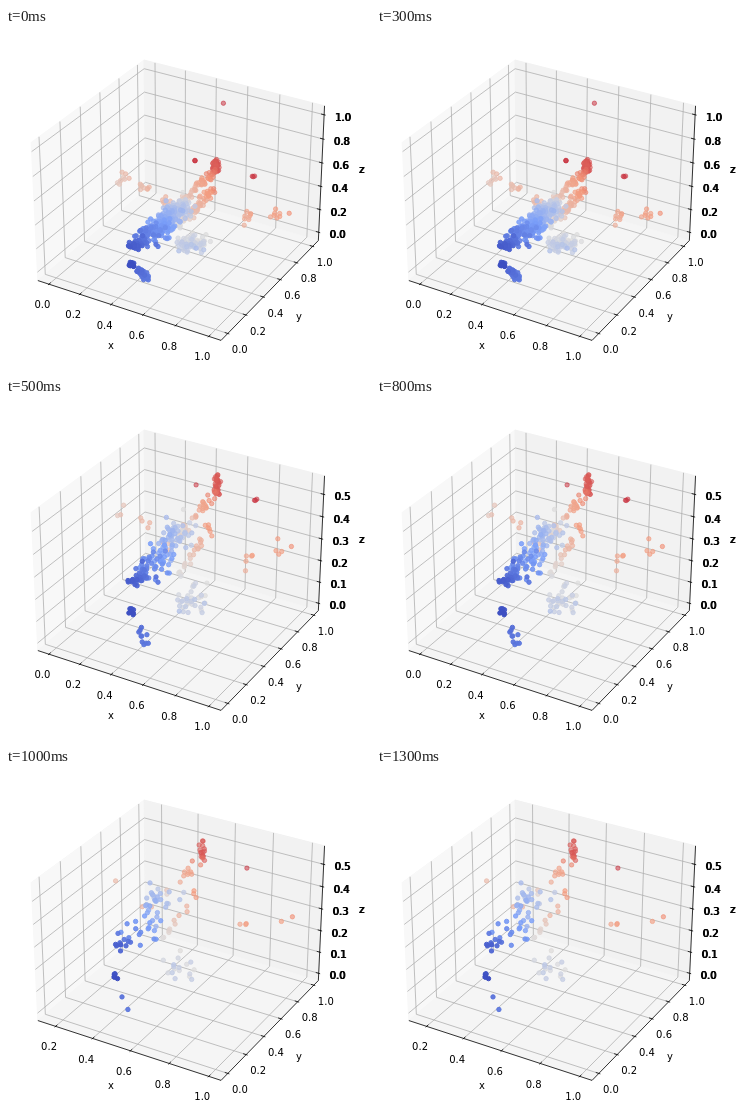
These frames come from a looping animation (365x342 px, 1500 ms). An HTML page:

```html
<!DOCTYPE html>
<html lang="en">
<head>
<meta charset="utf-8">
<title>3D scatter</title>
<style>
html, body { margin: 0; width: 100%; height: 100%; overflow: hidden; background: #fff; }
svg { display: block; width: 365px; height: 342px; font: 10px "DejaVu Sans", sans-serif; text-anchor: middle; }
.view { visibility: hidden; animation: show 1500ms step-end infinite; }
.grid { fill: none; stroke: #b0b0b0; stroke-width: .8; }
.axis { fill: none; stroke: #000; stroke-width: .8; }
@keyframes show {
  0% { visibility: visible; }
  33.3333% { visibility: hidden; }
  100% { visibility: hidden; }
}
</style>
</head>
<body>
<svg id="plot" viewBox="0 0 365 342"></svg>
<script>
const svg = document.getElementById('plot');

function add(parent, tag, attrs, text) {
  const el = document.createElementNS('http://www.w3.org/2000/svg', tag);
  for (const k in attrs) el.setAttribute(k, attrs[k]);
  if (text) el.textContent = text;
  return parent.appendChild(el);
}

// Perspective camera at elevation 30, azimuth -60; box coordinates run from -1 to 1.
function project([u, v, w]) {
  const x = u * .5952, y = v * .5952, z = w * .4464;
  const k = 1763 / (10 - (.433 * x - .75 * y + .5 * z));
  return [174.7 + k * (.866 * x + .5 * y), 165.5 - k * (-.25 * x + .433 * y + .866 * z)];
}

// Data value to box coordinate; the box is slightly larger than the limits.
const toBox = (value, [lo, hi]) => (2 * value - lo - hi) / (hi - lo) * 24 / 25;

const path = pts => 'M' + pts.map(p => project(p).map(n => n.toFixed(2))).join('L');

function label(g, x, y, text, copies = 1) {
  for (let i = 0; i < copies; i++) {
    add(g, 'text', { x: (x + i / 2).toFixed(2), y: (y + 3.6).toFixed(2) }, text);
  }
}

// Each axis: grid line and tick direction at box position t, label offset.
const axes = {
  x: { grid: t => [[t, -1, -1], [t, 1, -1], [t, 1, 1]], dir: [0, -1, 0], off: [-6.5, 20.5], copies: 1 },
  y: { grid: t => [[1, t, -1], [-1, t, -1], [-1, t, 1]], dir: [1, 0, 0], off: [12, 16], copies: 1 },
  z: { grid: t => [[1, 1, t], [-1, 1, t], [-1, -1, t]], dir: [1, 0, 0], off: [18.5, 2.5], copies: 3 }
};

function drawAxis(g, { grid, dir, off, copies }, limits, step) {
  for (let i = Math.ceil(limits[0] / step); i * step <= limits[1]; i++) {
    const pts = grid(toBox(i * step, limits));
    const shift = d => pts[0].map((c, j) => c + dir[j] * d);
    add(g, 'path', { class: 'grid', d: path(pts) });
    add(g, 'path', { class: 'axis', d: path([shift(-.032), shift(.016)]) });
    const [x, y] = project(pts[0]);
    label(g, x + off[0], y + off[1], Math.abs(i * step).toFixed(1), copies);
  }
}

const stops = [[59, 76, 192], [123, 159, 249], [221, 220, 220], [244, 152, 122], [180, 4, 38]];
function coolwarm(t) {
  const s = Math.min(.9999, Math.max(0, t)) * 4, i = Math.floor(s);
  return `rgb(${stops[i].map((c, j) => Math.round(c + (stops[i + 1][j] - c) * (s - i)))})`;
}

let seed = 4211;
const rnd = () => (seed = (seed * 16807) % 2147483647) / 2147483647;
const jitter = w => w * (rnd() + rnd() + rnd() - 1.5) * 1.4;

const cloud = [];
function strand(from, to, width, count) {
  for (let i = 0; i < count; i++) {
    const t = rnd();
    cloud.push({ pos: from.map((a, j) => a + (to[j] - a) * t + jitter(width)), rank: rnd() });
  }
}
const clump = (pos, width, count) => strand(pos, pos, width, count);

// One cloud of data: a body with tails, a red head and a sparse ring around them.
clump([.477, .02, .235], .012, 16);
strand([.475, .1, .12], [.495, .14, .03], .014, 28);
strand([.46, .06, .34], [.49, .13, .35], .02, 60);
strand([.49, .15, .37], [.55, .43, .46], .05, 240);
strand([.46, .48, .36], [.53, .8, .49], .016, 60);
strand([.48, .48, .21], [.55, .78, .37], .016, 60);
strand([.52, .86, .46], [.52, .86, .54], .014, 60);
strand([.53, .48, .11], [.66, .44, .17], .04, 70);
for (const x of [.06, .18, .33, .8, .98]) clump([x, .6 + .12 * x, .25 + .6 * (x - .55) ** 2], .03, 8);
for (const x of [.35, .73]) clump([x, .92, .45], .006, 3);
clump([.53, .92, 1], 0, 1);
cloud.sort((a, b) => b.pos[1] - a.pos[1]);

// Colour follows y; far points are more transparent.
function drawDots(g, limits, keep) {
  for (const { pos, rank } of cloud) {
    const inside = pos.every((p, j) => p >= limits[j][0] && p <= limits[j][1]);
    if (!inside || rank > keep) continue;
    const [cx, cy] = project(pos.map((p, j) => toBox(p, limits[j])));
    const color = coolwarm(pos[1]), alpha = (1 - .5 * pos[1]).toFixed(2);
    add(g, 'circle', {
      cx: cx.toFixed(1), cy: cy.toFixed(1), r: 2.2, fill: color, stroke: color,
      'fill-opacity': alpha, 'stroke-opacity': alpha
    });
  }
}

const unit = [-.05, 1.05], depth = [-.05, 1.035], low = [-.022, .569];
const views = [
  { limits: [unit, unit, unit], zStep: .2, keep: 1 },
  { limits: [unit, depth, low], zStep: .1, keep: .5 },
  { limits: [[.122, 1.042], depth, low], zStep: .1, keep: .23 }
];

const a = [-1, -1, -1], b = [1, -1, -1], c = [1, 1, -1], d = [-1, 1, -1];
const up = p => [p[0], p[1], 1];
const panes = [[[a, d, up(d), up(a)], '#f8f8f8'], [[d, c, up(c), up(d)], '#f2f2f2'], [[a, b, c, d], '#f5f5f5']];
for (const [pts, fill] of panes) add(svg, 'path', { d: path(pts) + 'Z', fill, stroke: fill });

views.forEach(({ limits, zStep, keep }, i) => {
  const g = add(svg, 'g', { class: 'view', style: `animation-delay:${(i - 3) * 500}ms` });
  drawAxis(g, axes.x, limits[0], .2);
  drawAxis(g, axes.y, limits[1], .2);
  drawAxis(g, axes.z, limits[2], zStep);
  drawDots(g, limits, keep);
});

add(svg, 'path', { class: 'axis', d: path([a, b, c, up(c)]) });
label(svg, 105, 317, 'x');
label(svg, 293, 288.5, 'y');
label(svg, 355.3, 141.5, 'z', 3);
</script>
</body>
</html>
```
